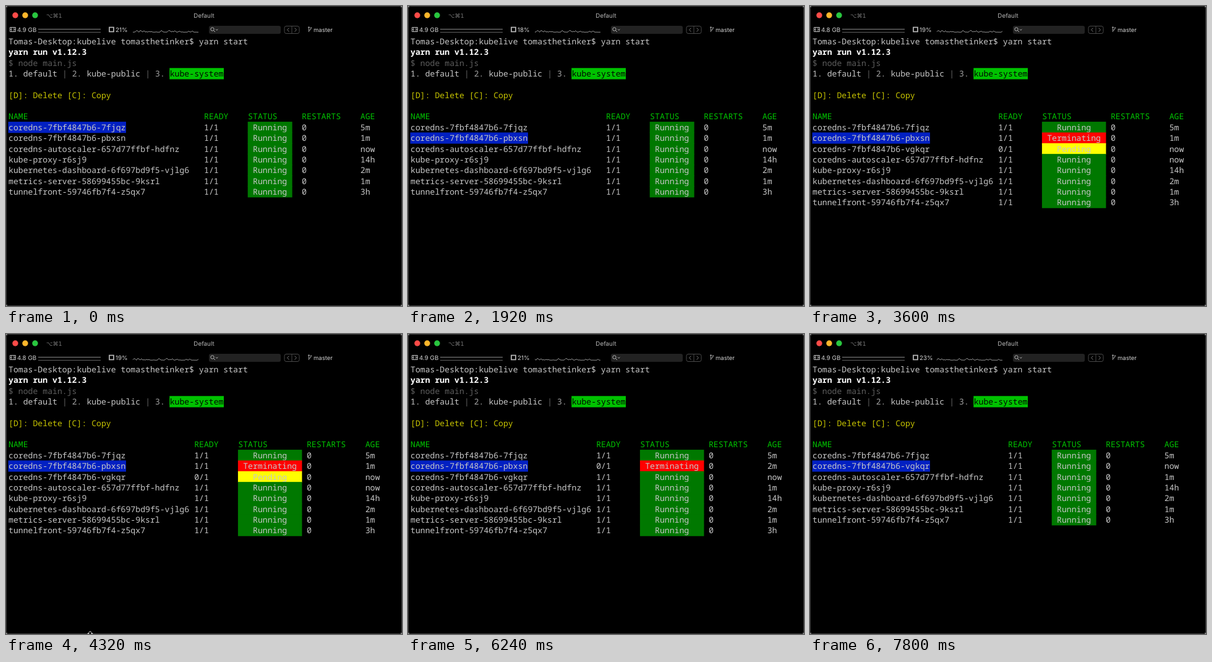
Recreate the animation shown at these times as an HTML page. Size 640x485 px, loop 7.92 s.

```html
<!DOCTYPE html>
<html lang="en">
<head>
<meta charset="utf-8">
<title>Terminal</title>
<style>
  html, body { margin: 0; width: 100%; height: 100%; overflow: hidden; background: #000; }
  svg { display: block; width: 640px; height: 485px; }
  text { white-space: pre; text-rendering: geometricPrecision; }
  .mono { font: 13.167px "Noto Sans Mono", "DejaVu Sans Mono", monospace; }
  .bold { font-weight: 700; }
  .ui { font: 9.8px Inter, Roboto, sans-serif; fill: #d0d0d0; }
  .line { fill: none; stroke: #b8b8b8; }
</style>
</head>
<body>
<svg viewBox="0 0 640 485">
  <rect width="640" height="485" fill="#b0b0b0"/>
  <rect width="640" height="485" rx="4"/>
  <rect x=".5" y=".5" width="639" height="484" rx="4" fill="none" stroke="#3c3c3c"/>
  <circle cx="15" cy="15" r="4.7" fill="#fc4b48"/>
  <circle cx="31" cy="15" r="4.7" fill="#fdb62b"/>
  <circle cx="47" cy="15" r="4.7" fill="#29c63f"/>
  <text x="65" y="18.5" style="font:9.2px 'DejaVu Sans',sans-serif" fill="#777">⌥⌘1</text>
  <text x="320" y="18.5" text-anchor="middle" class="ui" style="fill:#b4b4b4">Default</text>

  <g class="line">
    <path d="M6.5 34.5h9v7h-9zM9 34.5v7M13 34.5v7M6.5 38h2.5M13 38h2.5"/>
    <path d="M52 37.5h101" stroke="#aaa" stroke-width=".8"/>
    <path d="M52 42.5h101" stroke="#777" stroke-width=".8"/>
    <rect x="167" y="34.5" width="7" height="7" stroke-width="1.7"/>
  </g>
  <rect x="328" y="32" width="116" height="13" rx="3" fill="#222"/>
  <g class="line">
    <circle cx="333.5" cy="37.5" r="2.7"/>
    <path d="M335.5 39.5l2.5 2.5M339 37.5l1.7 1.7 1.7-1.7"/>
    <rect x="450" y="32.5" width="24" height="12" rx="3" stroke="#484848"/>
    <path d="M462 32.5v12" stroke="#484848"/>
    <path d="M457.5 35.5l-3 3 3 3M466.5 35.5l3 3-3 3" stroke="#777"/>
    <path d="M489.5 34v8M489.5 39.5q3.5 0 3.5-4M488 35l1.5-1.5 1.5 1.5M491.8 36l1.2-1.5 1.2 1.5" stroke-width=".9"/>
  </g>
  <text x="497" y="41.5" class="ui" style="font-size:9.5px">master</text>
  <g id="live"></g>
</svg>
<script>
const LOOP = 7920, STEP = 120;
const COL = 7.9, ROW = 17.36, LEFT = 4, TOP = 48.6;
const BLEED = 0.4; // closes the seams between stacked cells
const GREY = '#c7c7c7', GREEN = '#00c200', DIM = '#666', BLUE = '#0220c2';
const BADGE = { Running: '#007800', Terminating: '#ff0000', Pending: '#ffff00' };

// Moments at which the session changes
const MOVE = 960, DELETE = 2640, UNREADY = 4920, REPLACED = 6240, REMOVED = 7440;

// [from, memory, cpu]
const METERS = [
  [0, '4.9 GB', '21%'], [1200, '4.9 GB', '18%'], [3480, '4.8 GB', '19%'],
  [4800, '4.9 GB', '27%'], [6000, '4.9 GB', '21%'], [7200, '4.9 GB', '23%']
];

const live = document.getElementById('live');

const text = (col, row, str, fill = GREY, weight = '') =>
  `<text class="mono ${weight}" x="${LEFT + col * COL}" y="${TOP + row * ROW + 13.3}" fill="${fill}">${str}</text>`;

const box = (col, row, cols, fill) =>
  `<rect x="${LEFT + col * COL - BLEED}" y="${TOP + row * ROW - BLEED}"
    width="${cols * COL + 2 * BLEED}" height="${ROW + 2 * BLEED}" fill="${fill}"/>`;

const label = (x, str) => `<text class="ui" x="${x}" y="41.5">${str}</text>`;

function pods(t) {
  const first = ['coredns-7fbf4847b6-7fjqz', '1/1', 'Running', '5m'];
  const old = ['coredns-7fbf4847b6-pbxsn', t < UNREADY ? '1/1' : '0/1',
    t < DELETE ? 'Running' : 'Terminating', t < REPLACED ? '1m' : '2m'];
  const fresh = ['coredns-7fbf4847b6-vgkqr', ...(t < REPLACED ? ['0/1', 'Pending'] : ['1/1', 'Running']), 'now'];
  return [
    first,
    ...(t < REMOVED ? [old] : []),
    ...(t >= DELETE ? [fresh] : []),
    ['coredns-autoscaler-657d77ffbf-hdfnz', '1/1', 'Running', t < REPLACED ? 'now' : '1m'],
    ['kube-proxy-r6sj9', '1/1', 'Running', '14h'],
    ['kubernetes-dashboard-6f697bd9f5-vjlg6', '1/1', 'Running', '2m'],
    ['metrics-server-58699455bc-9ksrl', '1/1', 'Running', '1m'],
    ['tunnelfront-59746fb7f4-z5qx7', '1/1', 'Running', '3h']
  ];
}

function table(t) {
  const wide = t >= DELETE && t < REMOVED;
  const [ready, status, width, restarts, age] = wide ? [38, 47, 13, 61, 73] : [40, 49, 9, 60, 72];
  const picked = t < MOVE ? 0 : 1;
  const head = [[0, 'NAME'], [ready, 'READY'], [status, 'STATUS'], [restarts, 'RESTARTS'], [age, 'AGE']];
  let out = head.map(([col, str]) => text(col, 7, str, GREEN)).join('');
  pods(t).forEach(([name, up, state, since], i) => {
    const row = 8 + i;
    if (i === picked) out += box(0, row, name.length, BLUE);
    out += box(status, row, width, BADGE[state])
      + text(0, row, name) + text(ready, row, up)
      + text(status + Math.floor((width - state.length) / 2), row, state)
      + text(restarts, row, '0') + text(age, row, since);
  });
  return out;
}

function shell() {
  return text(0, 0, 'Tomas-Desktop:kubelive tomasthetinker$ yarn start')
    + text(0, 1, 'yarn run v1.12.3', '#fff', 'bold')
    + text(0, 2, '$ node main.js', '#5c5c5c')
    + text(0, 3, '1. default') + text(11, 3, '|', DIM)
    + text(13, 3, '2.', '#a0a0a0') + text(16, 3, 'kube-public')
    + text(28, 3, '|', DIM) + text(30, 3, '3.', '#a0a0a0')
    + box(33, 3, 11, GREEN) + text(33, 3, 'kube-system', '#000800')
    + text(0, 5, '[D]: Delete [C]: Copy', '#c7c400');
}

// Seeded load history that shifts left with every reading
function load(shift) {
  const points = [];
  for (let i = 0; i < 54; i++) {
    const n = Math.sin((i + shift + 7) * 12.9898) * 43758.5453;
    const r = n - Math.floor(n);
    points.push(`${205 + i * 2},${(42.3 - 3 * r ** 3).toFixed(1)}`);
  }
  return `<polyline class="line" stroke-width=".8" points="${points.join(' ')}"/>`;
}

function pointer(t) {
  if (t >= 4200 && t < 4320)
    return '<path class="line" d="M134 437q2 0 2 2v11q0 2-2 2M138 437q-2 0-2 2M136 450q0 2 2 2"/>';
  if (t >= 4320 && t < 4440)
    return '<path d="M132 484.5l4-4 4 4h-2.5v2h-3v-2z" fill="#000" stroke="#eee"/>';
  return '';
}

function draw(t) {
  const n = METERS.filter(m => m[0] <= t).length - 1;
  const [, memory, cpu] = METERS[n];
  live.innerHTML = label(18, memory) + label(177, cpu) + load(n) + shell() + table(t) + pointer(t);
}

let start = performance.now(), last = -1;
function tick(now) {
  const t = Math.floor(Math.max(0, now - start) % LOOP / STEP) * STEP;
  if (t !== last) draw(last = t);
  requestAnimationFrame(tick);
}
draw(0);
requestAnimationFrame(tick);
</script>
</body>
</html>
```
